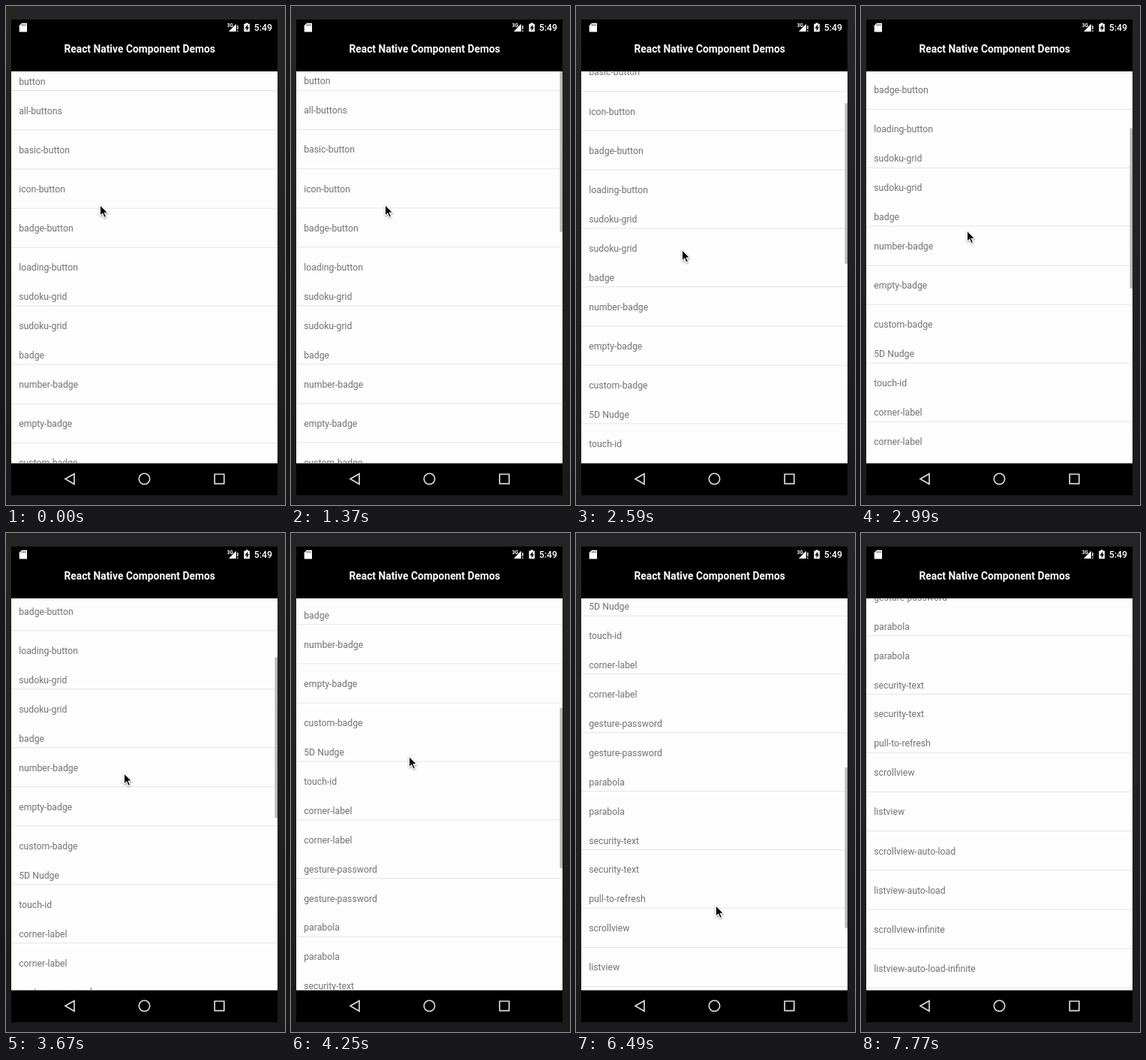
An HTML page for the animation above (8430 ms loop, 372 by 664 pixels).

```html
<!DOCTYPE html>
<html lang="en">
<head>
<meta charset="utf-8">
<title>Component list</title>
<style>
  html, body { margin: 0; width: 372px; height: 664px; overflow: hidden; background: #1e1e1e; }
  svg { display: block; font-family: Roboto, sans-serif; }
  #list { font-size: 12.25px; fill: #727272; }
  #list path { stroke: #e2e2e2; stroke-width: .9; }
  #cursor { filter: drop-shadow(0 1px 1px #0006); }
  .bold { font-weight: 700; }
</style>
</head>
<body>
<svg width="372" height="664" viewBox="0 0 372 664">
  <defs>
    <linearGradient id="wall" x2="0" y2="1">
      <stop offset="0" stop-color="#252525"/>
      <stop offset=".5" stop-color="#222"/>
      <stop offset="1" stop-color="#1a1a1a"/>
    </linearGradient>
    <clipPath id="view"><rect x="7" y="87" width="355" height="521.5"/></clipPath>
  </defs>
  <rect width="372" height="664" fill="url(#wall)"/>
  <rect x="7" y="18" width="355" height="633"/>

  <g fill="#fff">
    <path d="M21 22.8h7v11.7h-10.3v-8.2z"/>
    <path d="M21.5 24.2v2.3M23.7 24.2v2.3M25.9 24.2v2.3" stroke="#000" stroke-width=".8"/>
    <text x="294.8" y="27.6" font-size="6.5" class="bold">3G</text>
    <path d="M297 34h9.8V23.8l-4.2 4.4z"/>
    <path d="M308.2 26h1.4v5h-1.4zM308.2 32.4h1.4v1.6h-1.4z"/>
    <path d="M317.3 23.8h2.2v-1.4h3.2v1.4h2.2v10.4h-7.6z"/>
    <path d="M322.4 24.6l-4 5.2h2.3v3.6l3.4-5.2h-1.9z" fill="#000"/>
    <text x="330.7" y="33.4" font-size="12.3" font-weight="500">5:49</text>
    <text x="77.4" y="62" font-size="13.85" class="bold">React Native Component Demos</text>
  </g>

  <g clip-path="url(#view)">
    <rect x="7" y="87" width="355" height="522" fill="#fdfdfd"/>
    <g id="list"></g>
    <rect id="thumb" x="358.5" width="3.5" height="213.5" fill="#b9b9b9"/>
  </g>

  <g fill="none" stroke="#dcdcdc" stroke-width="1.7">
    <path d="M91 622.4v13.8l-12-6.9z"/>
    <circle cx="184.5" cy="629.2" r="7.2"/>
    <path d="M278.2 623h12.6v12.6h-12.6z"/>
  </g>

  <path id="cursor" d="M.5 .8v14.4l3.3-3.1 2.3 5.3 2.5-1.1-2.3-5.1h4.5z" stroke="#fff" stroke-width="1.1"/>
</svg>
<script>
const LOOP = 8430, HEAD = 25.6, ROW = 52.2, TOP = 87;
const REST = 360, DRAG = 28;
const $ = id => document.getElementById(id);

const sections = [
  'button all-buttons basic-button icon-button badge-button loading-button',
  'sudoku-grid sudoku-grid',
  'badge number-badge empty-badge custom-badge',
  '5D_Nudge touch-id',
  'corner-label corner-label',
  'gesture-password gesture-password',
  'parabola parabola',
  'security-text security-text',
  'pull-to-refresh scrollview listview scrollview-auto-load listview-auto-load scrollview-infinite listview-auto-load-infinite'
];

function buildList() {
  let y = TOP, out = '';
  sections.forEach((section, s) => {
    const names = section.split(' ');
    names.forEach((name, i) => {
      const h = i ? ROW : HEAD;
      out += `<text x="17.2" y="${y + h / 2 + 4.9}">${name.replace('_', ' ')}</text>`;
      y += h;
      // Only the final section has a rule below its last row.
      if (i < names.length - 1 || s === sections.length - 1) out += `<path d="M7 ${y}h355"/>`;
    });
  });
  $('list').innerHTML = out;
}

// Each flick presses at (x, y) and scrolls the list to an offset; the last entry leaves the stage.
const flicks = [
  { start: 1370, end: 2020, to: 103, x: 125, y: 264 },
  { start: 2590, end: 3150, to: 191, x: 141, y: 324 },
  { start: 3670, end: 4710, to: 395, x: 157, y: 319 },
  { start: 5420, end: 6070, to: 549, x: 162, y: 480 },
  { start: 6610, end: 7130, to: 756, x: 186, y: 495 },
  { start: 8130, end: LOOP, to: 756, x: 18, y: 690 }
];

const ramp = (t, a, b) => Math.max(0, Math.min(1, (t - a) / (b - a)));
const easeOut = u => 1 - (1 - u) ** 2;
const easeInOut = u => u * u * (3 - 2 * u);

// Scroll with each flick, raise the pointer as it drags, then glide to the next press and rest.
function poseAt(t) {
  let pos = 0, x = flicks[0].x, y = flicks[0].y;
  flicks.forEach((flick, i) => {
    if (i) {
      const glide = easeInOut(ramp(t, flicks[i - 1].end, flick.start - REST));
      x += (flick.x - x) * glide;
      y += (flick.y - y) * glide;
    }
    const pull = easeOut(ramp(t, flick.start, flick.end));
    pos += (flick.to - pos) * pull;
    y -= DRAG * pull;
  });
  return { pos, x, y };
}

function draw(t) {
  const { pos, x, y } = poseAt(t);
  $('list').setAttribute('transform', `translate(0 ${-pos})`);
  $('thumb').setAttribute('y', TOP + pos * .41);
  $('thumb').setAttribute('opacity', pos > 0 ? 1 - ramp(t, 7440, 7700) : 0);
  $('cursor').setAttribute('transform', `translate(${x} ${y})`);
}

buildList();
const begin = performance.now();
function tick() {
  draw((performance.now() - begin) % LOOP);
  requestAnimationFrame(tick);
}
tick();
</script>
</body>
</html>
```
